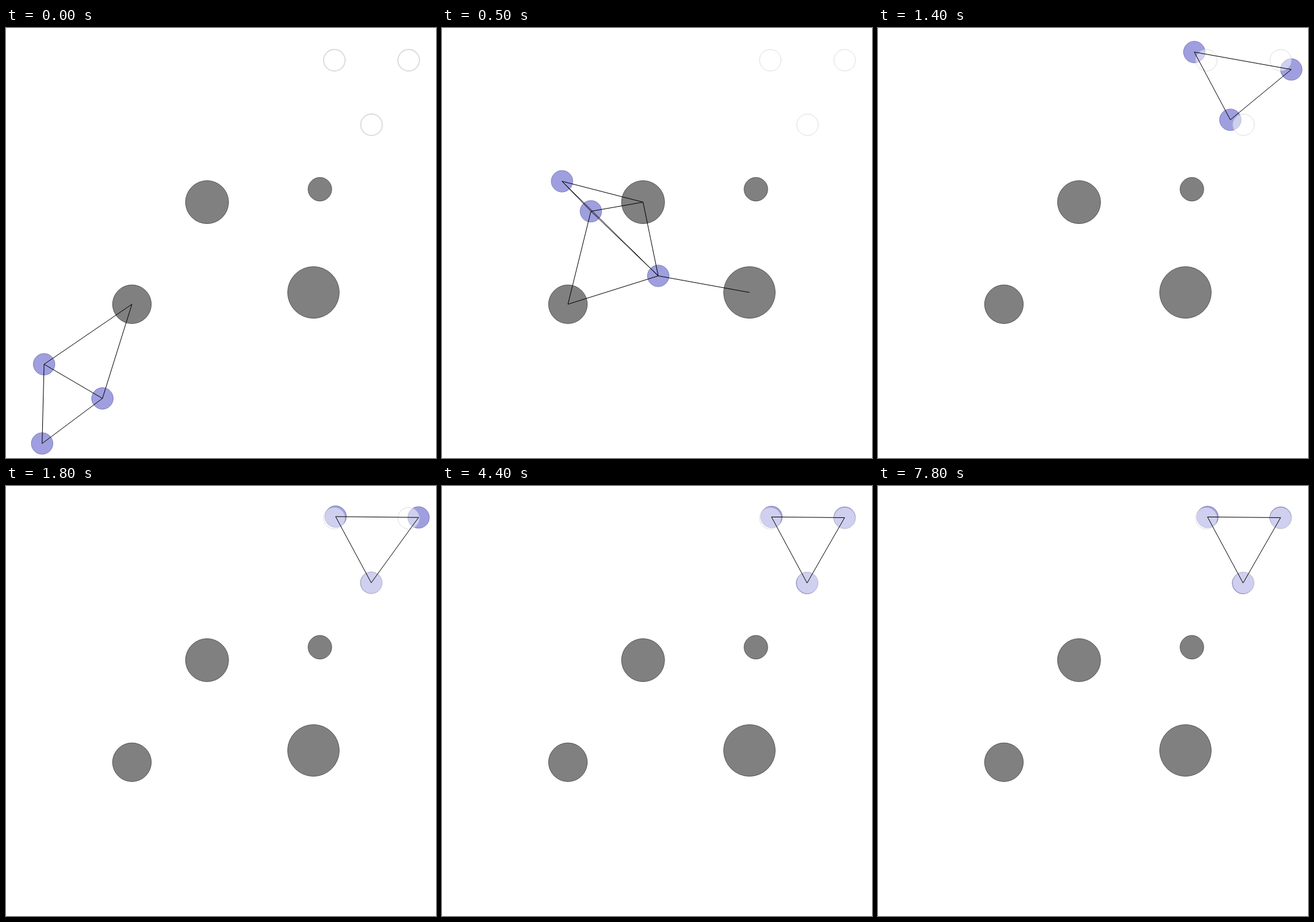
An HTML page for the animation above (9.1 s loop, 700 by 700 pixels).

```html
<!DOCTYPE html>
<html lang="en">
<head>
<meta charset="utf-8">
<title>Formation</title>
<style>
html, body { margin: 0; width: 100%; height: 100%; overflow: hidden; background: #fff; }
svg { display: block; width: 100vw; height: 100vh; }
.obstacle { fill: #808080; stroke: #555; }
.robot { fill: #9f9fdf; stroke: #7c7cbc; }
.goal { fill: rgba(255, 255, 255, .5); stroke: rgba(187, 187, 187, .5); }
line { stroke: #000; }
</style>
</head>
<body>
<svg id="stage" viewBox="0 0 700 700"></svg>
<script>
const LOOP = 9100, STEP = 100, LAST = 59;
const RADIUS = 17.5, RANGE = 180, ARRIVED = 210;
const HALF = 5, CLEAR = 10; // steps: midway, and past all obstacles

const obstacles = [
  { at: [205, 449.7], r: 31.5 },
  { at: [327.3, 283.5], r: 35 },
  { at: [500.5, 430.5], r: 42 },
  { at: [511, 262.5], r: 19.2 }
];

// Spring settings for the approach
const GLIDE = { damp: .55, freq: .3 };
const SWAY = { damp: .28, freq: .4 };

// Each robot travels from -> via -> exit, then springs to rest
const robots = [
  { from: [62, 547.4], via: [195.4, 249.5], exit: [382.8, 24], speed: [40, -15],
    rest: [536.4, 50.4], goal: [534.5, 52.5], spring: [GLIDE, GLIDE] },
  { from: [157, 603], via: [352, 403.5], exit: [500, 181.4], speed: [63, -40],
    rest: [655.4, 51.5], goal: [655.5, 52.5], spring: [SWAY, GLIDE] },
  { from: [58.8, 676.4], via: [242.4, 298.4], exit: [436.5, 138.6], speed: [45, -12],
    rest: [594.3, 158], goal: [595, 157.5], spring: [GLIDE, GLIDE] }
];

const svg = document.getElementById('stage');

function add(name, attrs, parent = svg) {
  const el = document.createElementNS('http://www.w3.org/2000/svg', name);
  for (const key in attrs) el.setAttribute(key, attrs[key]);
  return parent.appendChild(el);
}

const disc = (cls, [cx, cy], r = RADIUS) => add('circle', { class: cls, cx, cy, r });

obstacles.forEach(o => disc('obstacle', o.at, o.r));
robots.forEach(r => { r.disc = disc('robot', r.from); });
const rings = robots.map(r => disc('goal', r.goal));
const links = add('g', {});

// Cubic from a to b over one half of the trip, with end speeds va and vb
function curve(a, b, va, vb, u) {
  const v = 1 - u;
  return a * v * v * (1 + 2 * u) + b * u * u * (3 - 2 * u) + HALF * u * v * (v * va - u * vb);
}

function travel(from, via, exit, speed, step) {
  const cruise = (exit - from) / CLEAR;
  return step < HALF
    ? curve(from, via, (via - from) / HALF, cruise, step / HALF)
    : curve(via, exit, cruise, speed, step / HALF - 1);
}

// Damped oscillation that starts at offset d with the given speed
function settle(d, speed, { damp, freq }, s) {
  const swing = (speed + damp * d) / freq;
  return Math.exp(-damp * s) * (d * Math.cos(freq * s) + swing * Math.sin(freq * s));
}

function place({ from, via, exit, speed, rest, spring }, step) {
  return [0, 1].map(k => step < CLEAR
    ? travel(from[k], via[k], exit[k], speed[k], step)
    : rest[k] + settle(exit[k] - rest[k], speed[k], spring[k], step - CLEAR));
}

const dist = (a, b) => Math.hypot(a[0] - b[0], a[1] - b[1]);

function link(a, b) {
  add('line', { x1: a[0], y1: a[1], x2: b[0], y2: b[1] }, links);
}

function draw(step) {
  const spots = robots.map(r => place(r, step));
  links.replaceChildren();
  spots.forEach((p, i) => {
    robots[i].disc.setAttribute('cx', p[0]);
    robots[i].disc.setAttribute('cy', p[1]);
    spots.slice(i + 1).forEach(q => link(p, q));
    if (dist(p, robots[i].goal) > ARRIVED) {
      obstacles.filter(o => dist(p, o.at) < RANGE).forEach(o => link(p, o.at));
    }
  });
  rings.forEach(r => r.setAttribute('stroke-width', step ? 1 : 2));
}

const start = performance.now();
let shown = -1;

function tick() {
  const t = (performance.now() - start) % LOOP;
  const step = Math.min(Math.floor(t / STEP), LAST);
  if (step !== shown) draw(shown = step);
  requestAnimationFrame(tick);
}
tick();
</script>
</body>
</html>
```
